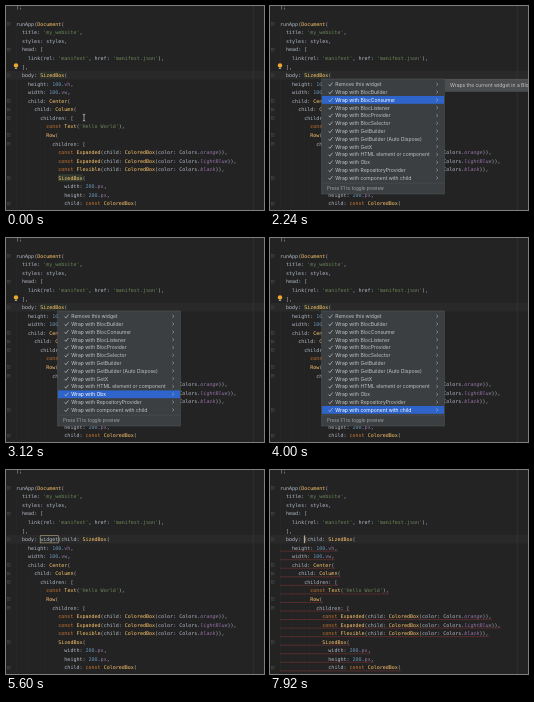
An HTML page that plays this animation: 258 px wide and 204 px high, repeating every 8 s.

```html
<!DOCTYPE html>
<html lang="en">
<head>
<meta charset="utf-8">
<title>Wrap with component</title>
<style>
html, body { margin: 0; width: 100%; height: 100%; overflow: hidden; background: #232323; }
svg { display: block; width: 258px; height: 204px; }
.code { font: 5.02px "DejaVu Sans Mono", monospace; white-space: pre; fill: #b2bac6; }
.ui { font: 5px Inter, sans-serif; fill: #c3c5c7; }
</style>
</head>
<body>
<svg id="stage" viewBox="0 0 258 204"></svg>
<script>
const LOOP = 8000, CHAR = 3.022, LEFT = 10, TOP = 18, PITCH = 8.55;
const ITEM_TOP = 78.3, ITEM_PITCH = 7.8;
const stage = document.getElementById('stage');

const lines = [
  '0runApp(Document(',
  "2title: 'my_website',",
  '2styles: styles,',
  '2head: [',
  "4link(rel: 'manifest', href: 'manifest.json'),",
  '2],',
  '2body: SizedBox(',
  '4height: 100.vh,',
  '4width: 100.vw,',
  '4child: Center(',
  '6child: Column(',
  '8children: [',
  "10const Text('Hello World'),",
  '10Row(',
  '12children: [',
  '14const Expanded(child: ColoredBox(color: Colors.orange)),',
  '14const Expanded(child: ColoredBox(color: Colors.lightBlue)),',
  '14const Flexible(child: ColoredBox(color: Colors.black)),',
  '14SizedBox(',
  '16width: 200.px,',
  '16height: 200.px,',
  '16child: const ColoredBox('
].map(s => {
  const [, indent, text] = s.match(/^(\d+)(.*)$/);
  return { indent: +indent, text };
});
const BODY = 6, INNER = 18;

const items = ['Remove this widget'].concat(
  ['BlocBuilder', 'BlocConsumer', 'BlocListener', 'BlocProvider', 'BlocSelector',
   'GetBuilder', 'GetBuilder (Auto Dispose)', 'GetX', 'HTML element or component',
   'Obx', 'RepositoryProvider', 'component with child'].map(s => 'Wrap with ' + s));

function add(parent, tag, attrs = {}, text) {
  const el = document.createElementNS('http://www.w3.org/2000/svg', tag);
  for (const k in attrs) el.setAttribute(k, attrs[k]);
  if (text !== undefined) el.textContent = text;
  parent.appendChild(el);
  return el;
}
const group = parent => add(parent, 'g');
const rect = (parent, x, y, width, height, fill, more = {}) =>
  add(parent, 'rect', { x, y, width, height, fill, ...more });
const path = (parent, d, stroke, width = 0.5) =>
  add(parent, 'path', { d, stroke, fill: 'none', 'stroke-width': width });
const colX = n => LEFT + n * CHAR;
const rowY = n => TOP + n * PITCH;
const show = (el, on) => el.setAttribute('display', on ? 'inline' : 'none');

const palette = [
  [/^'/, '#6a8759'],
  [/^const$/, '#cc7832'],
  [/^\d/, '#6897bb'],
  [/^(Document|SizedBox|Center|Column|Text|Row|Expanded|Flexible|ColoredBox)$/, '#ffc66d'],
  [/^(orange|lightBlue|black|vh|vw|px)$/, '#9876aa']
];

function paintCode(el, text) {
  el.textContent = '';
  for (const part of text.match(/'[^']*'|[A-Za-z]+|\d+|[^A-Za-z\d']+/g)) {
    const hit = palette.find(([re]) => re.test(part));
    const span = add(el, 'tspan', hit ? { fill: hit[1] } : {}, part);
    if (/^(orange|lightBlue|black)$/.test(part)) span.setAttribute('font-style', 'italic');
  }
}
function codeLine(parent, x, y, text) {
  const el = add(parent, 'text', { class: 'code', x, y: y + 1.8 });
  paintCode(el, text);
  return el;
}

// Editor background, gutter, margin and guides
rect(stage, 0, 0, 258, 204, '#232323');
rect(stage, 0, rowY(BODY) - 4.3, 258, PITCH, '#292929');
path(stage, 'M247.2 0V204', '#3c3c3c', 0.6);
lines.forEach((line, i) => {
  if (!/[[(]$/.test(line.text)) return;
  let end = i + 1;
  while (end < lines.length && lines[end].indent > line.indent) end++;
  path(stage, `M${colX(line.indent) + 0.5} ${rowY(i) + 4.5}V${rowY(end) - 4}`, '#2b2c2d', 0.4);
  rect(stage, 1.2, rowY(i) - 1.4, 2.8, 2.8, '#232323', { stroke: '#505355', 'stroke-width': 0.4 });
  path(stage, `M1.9 ${rowY(i)}h1.4`, '#66696b', 0.4);
});

// Usages of the word under the caret
const usages = group(stage);
rect(usages, colX(8), rowY(BODY) - 3.6, 8 * CHAR, 7.2, '#2b302a');
rect(usages, colX(14), rowY(INNER) - 3.6, 8 * CHAR, 7.2, '#323b30');

const field = rect(stage, colX(8), rowY(BODY) - 3.6, CHAR, 7.2, '#2c2c2c',
  { stroke: '#b9a88a', 'stroke-width': 0.6 });

codeLine(stage, LEFT, 1, ');');
const rows = lines.map((l, i) => codeLine(stage, colX(l.indent), rowY(i), l.text));

const errors = group(stage);
for (let i = BODY + 1; i < lines.length; i++) {
  const to = colX(lines[i].indent + lines[i].text.length);
  let d = `M${LEFT} ${rowY(i) + 3.7}`;
  for (let x = LEFT, up = true; x < to; x += 1, up = !up) d += `l1 ${up ? -0.8 : 0.8}`;
  path(errors, d, '#a33a38', 0.4);
}

const bulb = group(stage);
add(bulb, 'circle', { cx: 10, cy: 59.4, r: 2.2, fill: '#f0a732' });
rect(bulb, 9, 61.8, 2, 1.2, '#a5a7a8');

const pointer = path(stage, 'M76.8 108.2Q78 108.2 78 109.2Q78 108.2 79.2 108.2M78 109V114M76.8 115Q78 115 78 114Q78 115 79.2 115',
  '#e4e4e4', 0.6);

// Action list
const menu = group(stage);
rect(menu, 51.7, 73, 122.6, 115, '#3c3f41', { stroke: '#565859', 'stroke-width': 0.5 });
const mark = rect(menu, 52, 0, 122, ITEM_PITCH, '#2f65ca');
const labels = items.map((text, i) => {
  const y = ITEM_TOP + i * ITEM_PITCH;
  path(menu, `M58.6 ${y + 0.2}l1.3 1.5l2.6 -3.4`, '#b4b7b9', 0.8);
  path(menu, `M166.4 ${y - 1.4}l1.5 1.4l-1.5 1.4`, '#b4b7b9', 0.6);
  return add(menu, 'text', { class: 'ui', x: 65.3, y: y + 1.8 }, text);
});
path(menu, 'M52 177.2H174', '#515456', 0.4);
add(menu, 'text', { class: 'ui', x: 57, y: 184, style: 'font-size:4.6px;fill:#a3a6a8' },
  'Press F1 to toggle preview');

const preview = group(stage);
rect(preview, 175, 72.5, 90, 24.5, '#232323', { stroke: '#565859', 'stroke-width': 0.5 });
rect(preview, 187, 83.8, 75, 10, '#2b2c2d', { stroke: '#4a4c4e', 'stroke-width': 0.4 });
codeLine(preview, 181.5, 77.5, 'body: Center(');
codeLine(preview, 189, 89, '),');

const tip = group(stage);
rect(tip, 175.5, 73.2, 90, 12, '#4b4d4f', { stroke: '#616365', 'stroke-width': 0.5 });
add(tip, 'text', { class: 'ui', x: 180, y: 80.8 }, 'Wraps the current widget in a BlocConsumer');

function choice(t) {
  if (t < 1840) return 0;
  if (t < 2080) return 1;
  if (t < 2320) return 2;
  return Math.min(items.length - 1, 3 + Math.floor((t - 2320) / 112));
}
function typed(t) {
  if (t < 6240) return 'widget';
  return t < 7120 ? 'C' : '';
}

let lastText = '';
function draw(t) {
  const open = t >= 480 && t < 4480, wrapped = t >= 5360;
  const pick = choice(t), name = wrapped ? typed(t) : '';
  show(menu, open);
  show(preview, open && t >= 800 && pick === 0);
  show(tip, open && (pick === 1 || pick === 2));
  show(pointer, t < 480);
  show(bulb, !wrapped);
  show(usages, !wrapped);
  show(errors, t >= 7120);

  mark.setAttribute('y', ITEM_TOP + pick * ITEM_PITCH - ITEM_PITCH / 2);
  labels.forEach((el, i) => el.style.fill = i === pick ? '#ffffff' : '');

  const text = wrapped ? `body: ${name}(child: SizedBox(` : lines[BODY].text;
  if (text !== lastText) paintCode(rows[BODY], lastText = text);

  show(field, wrapped);
  field.setAttribute('width', Math.max(0.6, name.length * CHAR));
}

function tick(now) {
  draw(now % LOOP);
  requestAnimationFrame(tick);
}
draw(0);
requestAnimationFrame(tick);
</script>
</body>
</html>
```
